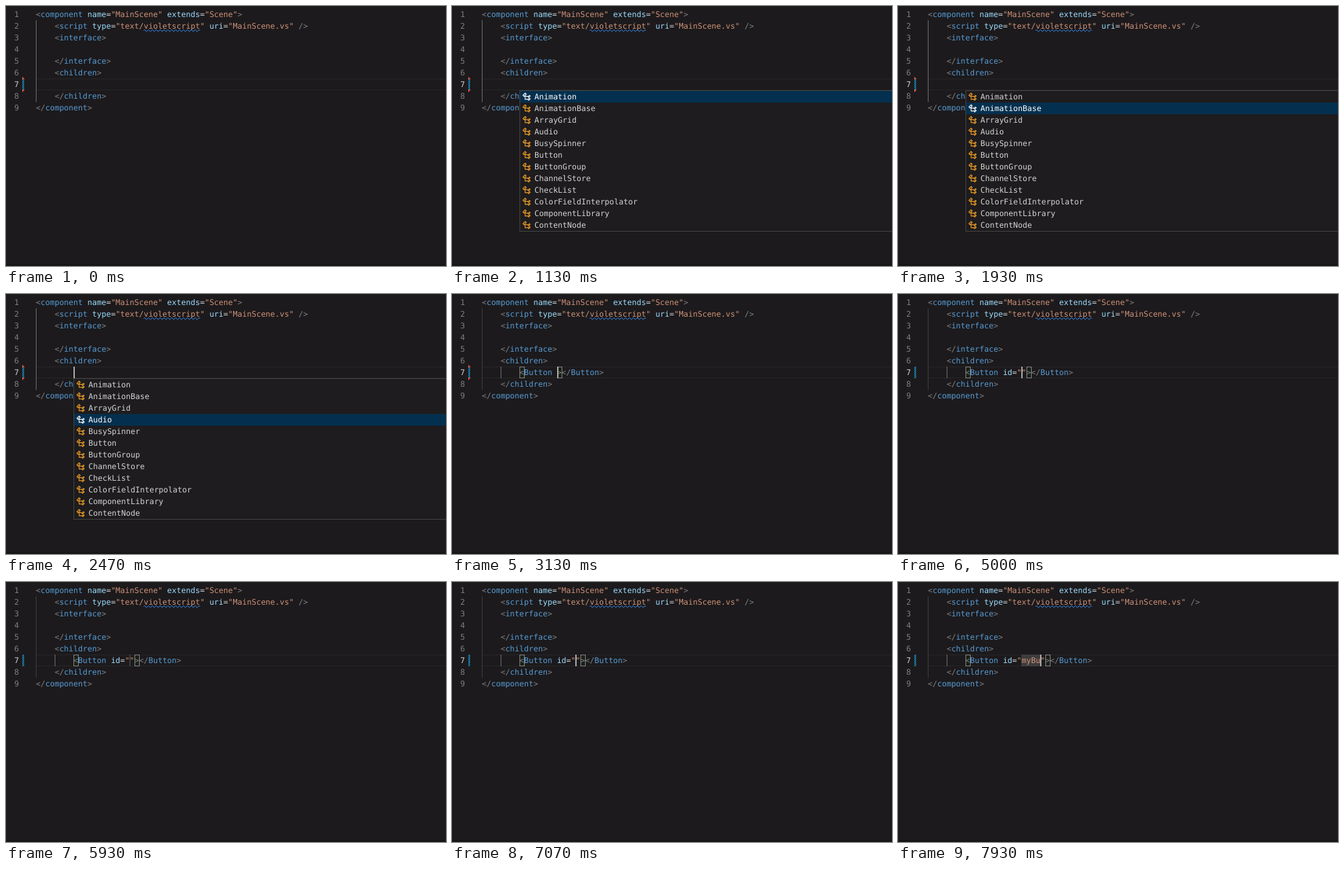
An HTML page that plays this animation: 678 by 401 pixels, repeating every 8000 ms.

```html
<!DOCTYPE html>
<html lang="en">
<head>
<meta charset="utf-8">
<title>Code completion</title>
<style>
  html, body { margin: 0; width: 100%; height: 100%; overflow: hidden; background: #1c1a1c; }
  #stage {
    position: relative; width: 678px; height: 401px; overflow: hidden;
    font: 12px/18px "DejaVu Sans Mono", monospace; color: #d4d4d4;
    white-space: pre; text-rendering: geometricPrecision;
  }
  #stage div, #stage svg { position: absolute; box-sizing: border-box; }
  .number { left: 0; width: 20px; text-align: right; color: #7f7f7f; }
  .number.current { color: #d0d0d0; }
  .line { left: 46px; }
  .punctuation { color: #808080; }
  .tag { color: #569cd6; }
  .attribute { color: #9cdcfe; }
  .string { color: #ce9178; }
  #currentLine { left: 46px; top: 112px; width: 640px; height: 18px; border: solid #282728; border-width: 1.5px 0; }
  #outerGuide { left: 46px; top: 22px; width: 1px; height: 126px; }
  #innerGuide { left: 75px; top: 112px; width: 1px; height: 18px; background: #707070; }
  #modified {
    left: 25px; top: 112px; width: 3px; height: 18px;
    background: repeating-linear-gradient(-45deg, #1b81a8 0 1.1px, #1c2d3a 1.1px 2.1px);
  }
  .deleted { left: 25px; width: 4px; height: 4px; background: #f0513c; }
  .bracket { top: 112px; width: 8px; height: 18px; border: 1px solid #888; background: rgba(0, 100, 0, .1); }
  #placeholder { top: 112px; height: 18px; background: rgba(124, 124, 124, .35); }
  #cursor { top: 112px; width: 2px; height: 18px; background: #aeafad; }
  .popup { top: 130px; width: 640px; border: 1px solid #454545; background: #1e1c1e; }
  .item { left: 0; width: 100%; height: 18px; padding-left: 22px; color: #d4d4d4; }
  .item svg { left: 3px; top: 2px; width: 14px; height: 14px; color: #ee9d28; }
  .item.selected { background: #04304f; color: #fff; }
  .item.selected svg { color: #fff; }
  .match { color: #2aaaff; font-weight: bold; }
  svg { fill: none; stroke: currentColor; }
  #bottomEdge { left: 0; bottom: 0; width: 100%; height: 3px; background: #181718; }
</style>
</head>
<body>
<svg width="0" height="0" style="position:absolute">
  <symbol id="classIcon" viewBox="0 0 16 16">
    <path stroke-width="1.3" d="M1.5 5.4 5.4 1.5 7.3 3.4 3.4 7.3zM5.3 5.8V12.4H10.4M5.3 7.3H10.4M13 5.5 14.3 6.7 11.7 9.3 10.4 8zM13 10.5 14.3 11.7 11.7 14.3 10.4 13z"/>
  </symbol>
  <symbol id="fieldIcon" viewBox="0 0 16 16">
    <path stroke-width="1.3" d="M1.5 6.5 9 2.6 14.5 5.3V9.8L7 13.7 1.5 11zM1.5 6.5 7 9.2 14.5 5.3M7 9.2V13.7"/>
  </symbol>
</svg>
<div id="stage"></div>
<script>
const LOOP = 8000, CHAR = 7.2246, LEFT = 46, ROW = 18, TOP = 4;
const EDIT_ROW = 6, TAG_COLUMN = 8, VALUE_COLUMN = 20;
const LIST_OPEN = 400, LIST_ACCEPT = 2930, HINT_OPEN = 4130, HINT_ACCEPT = 5000;
const MARKERS_CLEARED = 3530;
const SELECTION_MOVES = [1930, 2130, 2330, 2530, 2730];

const source = [
  '<component name="MainScene" extends="Scene">',
  '    <script type="text/violetscript" uri="MainScene.vs" />',
  '    <interface>', '', '    </interface>',
  '    <children>', '', '    </children>', '</component>'
];
const components = ['Animation', 'AnimationBase', 'ArrayGrid', 'Audio', 'BusySpinner', 'Button',
  'ButtonGroup', 'ChannelStore', 'CheckList', 'ColorFieldInterpolator', 'ComponentLibrary', 'ContentNode'];

// Each edit restarts the cursor blink; "|" marks the cursor.
const edits = [
  [-700, '|'],
  [LIST_ACCEPT, '<Button |></Button>'],
  [3800, '<Button i|></Button>'],
  [4000, '<Button id|></Button>'],
  [HINT_ACCEPT, '<Button id="|"></Button>'],
  [7270, '<Button id="m|"></Button>'],
  [7470, '<Button id="my|"></Button>'],
  [7730, '<Button id="myB|"></Button>'],
  [7870, '<Button id="myBu|"></Button>']
].map(([time, text]) => ({ time, text: ' '.repeat(TAG_COLUMN) + text }));

const stage = document.getElementById('stage');
const columnX = column => LEFT + column * CHAR;

function add(parent, props = {}, style = {}) {
  const element = document.createElement('div');
  Object.assign(element, props);
  Object.assign(element.style, style);
  return parent.appendChild(element);
}

function show(element, visible) {
  element.style.display = visible ? '' : 'none';
}

function highlight(code) {
  const token = /("[^"]*")|(<\/?)(\w+)|(\/?>)|(\w+)(?==)/g;
  const span = (kind, text) =>
    `<span class="${kind}">${text.replace('<', '&lt;').replace('>', '&gt;')}</span>`;
  return code.replace(token, (all, string, open, tag, close, attribute) => {
    if (string) return span('string', string);
    if (open) return span('punctuation', open) + span('tag', tag);
    return close ? span('punctuation', close) : span('attribute', attribute);
  });
}

function squiggle(row, from, to, color) {
  const width = (to - from) * CHAR;
  let path = 'M0 2';
  for (let x = 0; x < width; x += 6) path += 'q1.5 -3 3 0t3 0';
  const holder = add(stage, {
    innerHTML: `<svg width="${width}" height="4" style="color:${color}"><path d="${path}"/></svg>`
  }, { left: columnX(from) + 'px', top: TOP + row * ROW + 14 + 'px' });
  return holder;
}

function popup(column, labels, icon) {
  const box = add(stage, { className: 'popup' },
    { left: Math.round(columnX(column)) + 'px', height: labels.length * ROW + 2 + 'px' });
  box.items = labels.map((label, i) => add(box, {
    className: 'item',
    innerHTML: `<svg><use href="#${icon}"/></svg>${label}`
  }, { top: i * ROW + 'px' }));
  return box;
}

add(stage, { id: 'bottomEdge' });
add(stage, { id: 'currentLine' });
const outerGuide = add(stage, { id: 'outerGuide' });
const innerGuide = add(stage, { id: 'innerGuide' });
const placeholder = add(stage, { id: 'placeholder' });
const brackets = [0, 1].map(() => add(stage, { className: 'bracket' }));

const lines = source.map((code, row) => {
  const top = TOP + row * ROW + 'px';
  add(stage, { className: row === EDIT_ROW ? 'number current' : 'number', textContent: row + 1 }, { top });
  return add(stage, { className: 'line', innerHTML: highlight(code) }, { top });
});

add(stage, { id: 'modified' });
const deletedMarks = [
  ['109px', 'polygon(0 0, 100% 100%, 0 100%)'],
  ['129px', 'polygon(0 0, 100% 0, 0 100%)']
].map(([top, clipPath]) => add(stage, { className: 'deleted' }, { top, clipPath }));

squiggle(1, 23, 35, '#3794ff');
const errorMark = squiggle(EDIT_ROW, 17, 18, '#f14c4c');
const cursor = add(stage, { id: 'cursor' });
const list = popup(TAG_COLUMN, components, 'classIcon');
const hint = popup(18, ['<span class="match">id</span>'], 'fieldIcon');
hint.items[0].classList.add('selected');

let shownEdit;

function applyEdit(edit) {
  shownEdit = edit;
  const code = edit.text.replace('|', '');
  const hasTag = code.includes('<');
  const value = code.match(/"(.*)"/);
  lines[EDIT_ROW].innerHTML = highlight(code);
  cursor.style.left = Math.round(columnX(edit.text.indexOf('|'))) + 'px';

  [TAG_COLUMN, code.indexOf('>')].forEach((column, i) => {
    show(brackets[i], hasTag);
    brackets[i].style.left = Math.round(columnX(column)) + 'px';
  });
  show(placeholder, value);
  placeholder.style.left = columnX(VALUE_COLUMN) + 'px';
  placeholder.style.width = Math.max(2, (value ? value[1].length : 0) * CHAR) + 'px';

  show(innerGuide, hasTag);
  outerGuide.style.background = hasTag ? '#404040' : '#707070';
  show(errorMark, code.includes('id>'));
}

function render(t) {
  const edit = edits.filter(({ time }) => time <= t).pop();
  if (edit !== shownEdit) applyEdit(edit);
  show(cursor, (t - edit.time) % 1000 < 500);

  const selected = SELECTION_MOVES.filter(time => time <= t).length;
  list.items.forEach((item, i) => item.classList.toggle('selected', i === selected));
  show(list, t >= LIST_OPEN && t < LIST_ACCEPT);
  show(hint, t >= HINT_OPEN && t < HINT_ACCEPT);
  deletedMarks.forEach(mark => show(mark, t < MARKERS_CLEARED));
}

const start = performance.now();
function tick() {
  render((performance.now() - start) % LOOP);
  requestAnimationFrame(tick);
}
tick();
</script>
</body>
</html>
```
